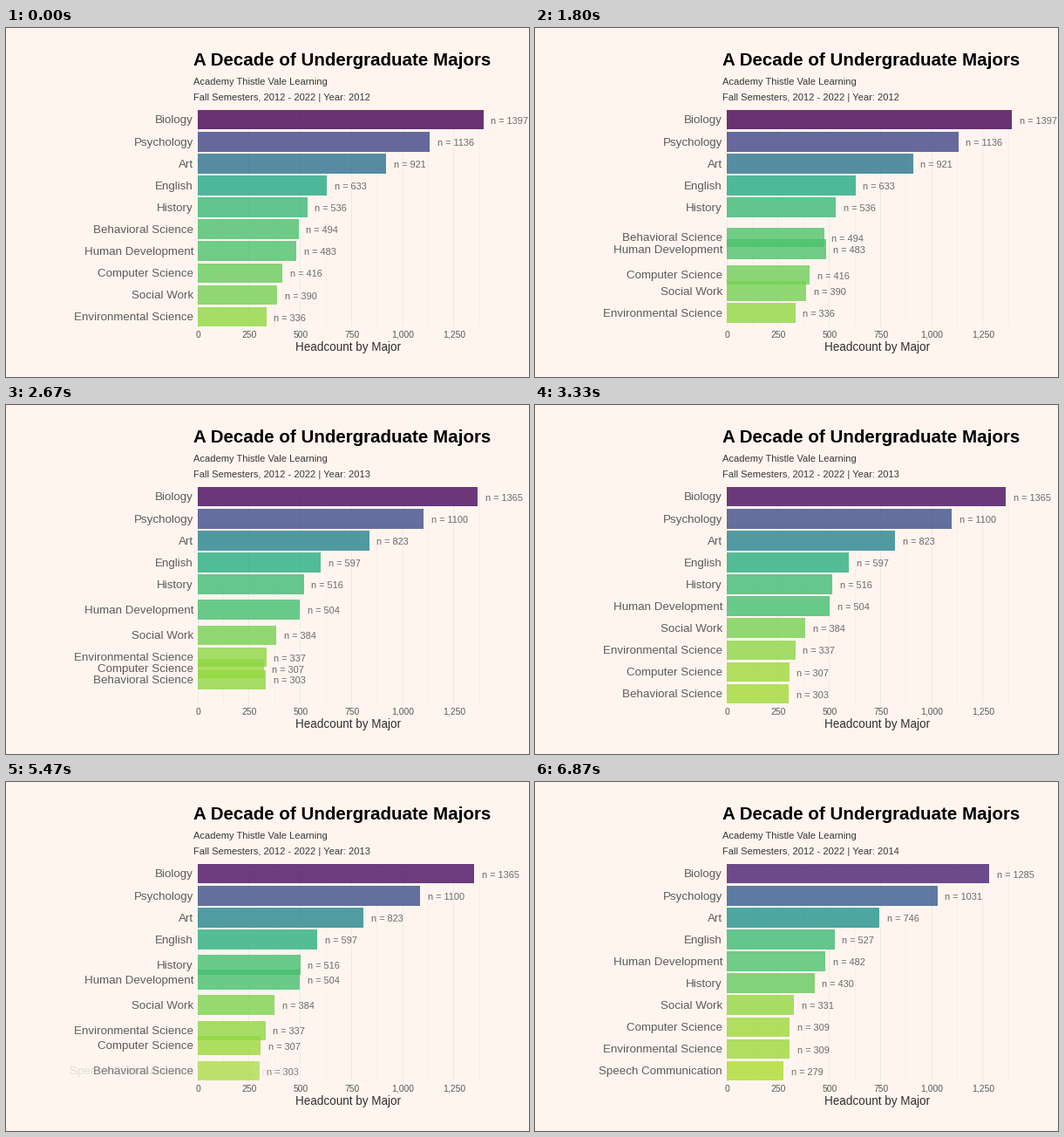
Recreate the animation shown at these times as a matplotlib script. Size 600 px wide and 400 px high, loop 8000 ms.

```python
import matplotlib.pyplot as plt
from matplotlib.animation import FuncAnimation
from matplotlib.patches import Rectangle

WIDTH, HEIGHT, DPI = 600, 400, 100
FRAMES, INTERVAL = 400, 20
TWEEN = 35            # steps per transition, at 15 steps a second
STARTS = (17, 70)     # steps at which the transitions begin

X0, SCALE = 219.75, 0.2348            # zero line, pixels per head
TOP, ROW, BAR = 105.15, 25.1, 22.6    # first row centre, pitch, bar height
PAPER = "#FFF5EE"
MAX_COUNT, COUNT_RANGE = 1397, 1275

YEARS = [
    (2012, {"Biology": 1397, "Psychology": 1136, "Art": 921, "English": 633,
            "History": 536, "Behavioral Science": 494,
            "Human Development": 483, "Computer Science": 416,
            "Social Work": 390, "Environmental Science": 336}),
    (2013, {"Biology": 1365, "Psychology": 1100, "Art": 823, "English": 597,
            "History": 516, "Human Development": 504, "Social Work": 384,
            "Environmental Science": 337, "Computer Science": 307,
            "Behavioral Science": 303}),
    (2014, {"Biology": 1285, "Psychology": 1031, "Art": 746, "English": 527,
            "Human Development": 482, "History": 430, "Social Work": 331,
            "Computer Science": 309, "Environmental Science": 309,
            "Speech Communication": 279}),
]
MAJORS = list(dict.fromkeys(m for _, counts in YEARS for m in counts))

plt.rcParams["font.family"] = "Liberation Sans"
fig = plt.figure(figsize=(WIDTH / DPI, HEIGHT / DPI), dpi=DPI, facecolor=PAPER)
ax = fig.add_axes([0, 0, 1, 1])
ax.set(xlim=(0, WIDTH), ylim=(HEIGHT, 0))
ax.axis("off")
viridis = plt.get_cmap("viridis")


def points(px):
    return px * 72 / DPI


def label(x, y, text, px, color, ha="left", **style):
    return ax.text(x, y, text, fontsize=points(px), color=color, ha=ha,
                   va="baseline", zorder=3, **style)


def ease(p):
    """Cubic in-out."""
    return 4 * p ** 3 if p < 0.5 else 1 - 4 * (1 - p) ** 3


def mix(a, b, e):
    return a + (b - a) * e


def fill(count):
    return viridis((MAX_COUNT - count) / COUNT_RANGE)


def progress(step):
    """Index of the state being left and linear progress to the next one."""
    index = 1 if step >= STARTS[1] else 0
    return index, min(max((step - STARTS[index]) / TWEEN, 0), 1)


for count in range(0, 1376, 125):
    x = X0 + count * SCALE
    major = count % 250 == 0
    ax.plot([x, x], [94, 342], color="#EBEBEB", zorder=1,
            lw=points(1 if major else 0.55), solid_capstyle="butt")
    if major:
        label(x + 0.8, 355, f"{count:,}", 10.4, "#5A5A5A", "center")

label(215, 43, "A Decade of Undergraduate Majors", 20.5, "black",
      weight="bold")
label(215, 65, "Academy Thistle Vale Learning", 11.1, "#383838")
subtitle = label(215, 83, "", 11.1, "#383838")
label(393, 370, "Headcount by Major", 13.5, "#303030", "center")

rows = {}
for major in MAJORS:
    bar = Rectangle((X0, 0), 0, BAR, linewidth=0, zorder=2, snap=True)
    ax.add_patch(bar)
    name = label(215, 0, major, 13.4, "#5C5C5C", "right")
    value = label(0, 0, "", 11, "#6A6A6A")
    rows[major] = bar, name, value


def place(major, count, rank, shown, opacity):
    bar, name, value = rows[major]
    y = TOP + ROW * rank
    bar.set_bounds(X0, y - BAR / 2, count * SCALE, BAR)
    bar.set_facecolor(fill(count))
    bar.set_alpha(0.8 * opacity)
    name.set_y(y + 4.3)
    name.set_alpha(opacity)
    value.set_position((X0 + count * SCALE + 8.6, y + 4.6))
    value.set_text(f"n = {shown}")
    value.set_alpha(opacity)


def update(frame):
    step = (frame * 3 + 2) // 10    # three steps in every ten frames
    index, p = progress(step)
    e = ease(p)
    (year_a, old), (year_b, new) = YEARS[index:index + 2]
    subtitle.set_text("Fall Semesters, 2012 - 2022 | Year: "
                      f"{year_a if p < 0.5 else year_b}")
    ranks_a = {m: i for i, m in enumerate(old)}
    ranks_b = {m: i for i, m in enumerate(new)}
    for major in MAJORS:
        if major in old and major in new:
            place(major, mix(old[major], new[major], e),
                  mix(ranks_a[major], ranks_b[major], e),
                  (old if p < 0.5 else new)[major], 1)
        elif major in old:
            place(major, old[major], ranks_a[major], old[major], 1 - e)
        elif major in new:
            place(major, new[major], ranks_b[major], new[major], e)
        else:
            place(major, 0, 0, 0, 0)
    return []


anim = FuncAnimation(fig, update, frames=FRAMES, interval=INTERVAL,
                     init_func=lambda: update(0), repeat=True, repeat_delay=0)
plt.show()
```
